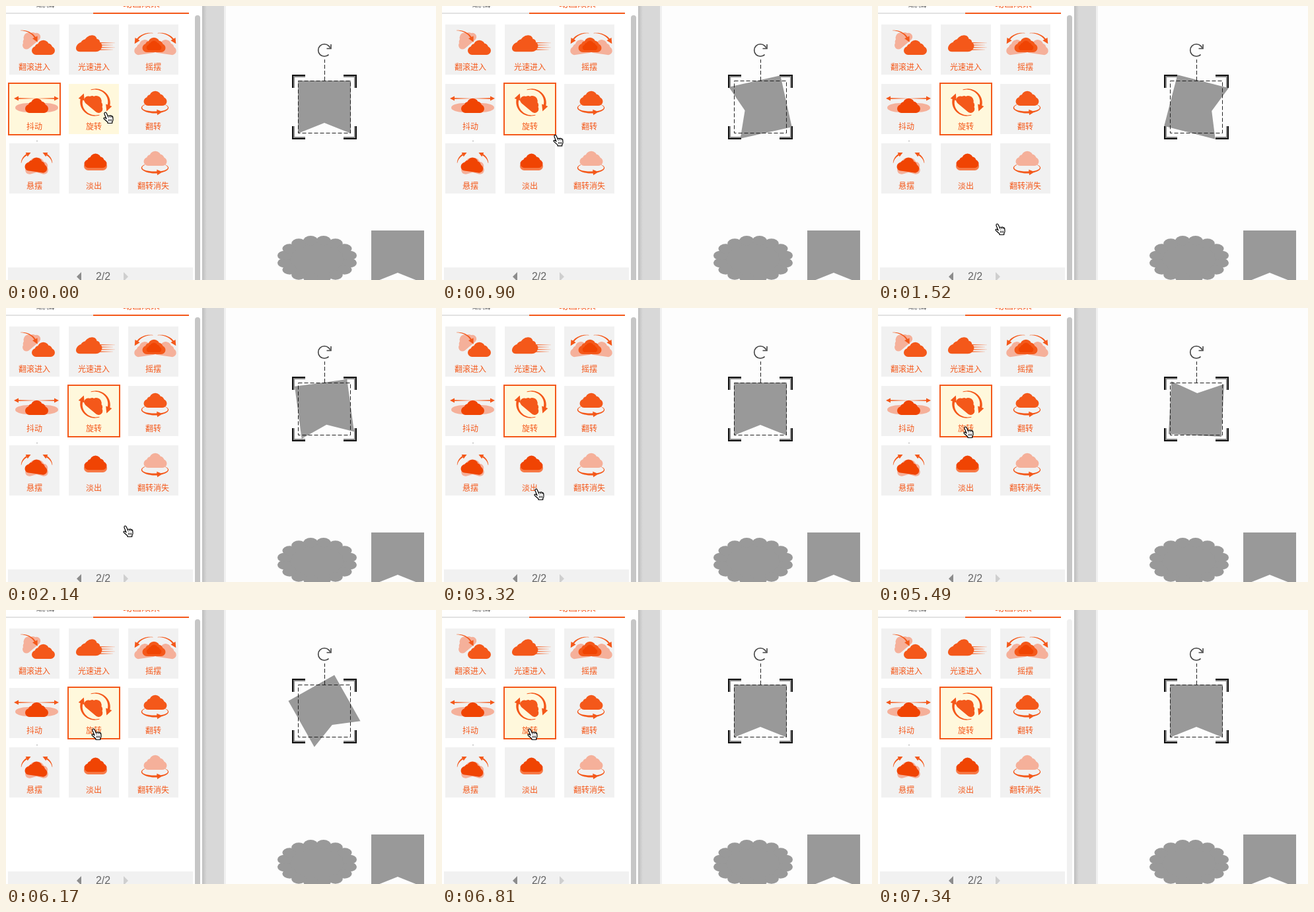
An HTML page with a canvas for the animation above (8560 ms loop, 651 by 415 pixels).

```html
<!DOCTYPE html>
<html lang="zh-CN">
<head>
<meta charset="utf-8">
<title>动画效果</title>
<style>
html, body { margin: 0; width: 100%; height: 100%; overflow: hidden; background: #fff; }
canvas { display: block; }
</style>
</head>
<body>
<canvas id="stage" width="651" height="415"></canvas>
<script>
const ctx = document.getElementById('stage').getContext('2d');
const LOOP = 8560;
const CJK = '"Noto Sans CJK SC", "Noto Sans CJK", sans-serif';
const ORANGE = '#f4581a', DEEP = '#f04403', PALE = '#f5b09a', SOFT = '#f77a48';
const TILE = '#f1f1f1', WARM = '#fff8dc', GRAY = '#999';
const RAD = Math.PI / 180;

// bursts of screen updates: start, end, step
const BURSTS = [
  [480, 480, 1], [620, 2540, 56.2], [3320, 3660, 56.6], [4470, 4640, 56.6],
  [4970, 5780, 57.7], [5830, 6870, 56.6], [7040, 7340, 75]
];
// pointer path: time, x, y
const PATH = [
  [0, 147, 160], [760, 147, 160], [900, 168, 194], [1080, 174, 269], [1300, 177, 329],
  [3270, 177, 329], [3320, 139, 273], [3660, 126, 202], [4420, 126, 202], [4470, 126, 197],
  [4640, 129, 179], [6985, 129, 179], [7040, 142, 198], [7280, 306, 397], [LOOP, 306, 430]
];
const SPINS = [588, 4922], SPIN_MS = 1907;

function heldTime(t) {
  let held = 0;
  for (const [start, end, step] of BURSTS) {
    if (t >= start) held = start + Math.floor((Math.min(t, end) - start) / step) * step;
  }
  return held;
}

function pointerAt(t) {
  const i = Math.max(1, PATH.findIndex(p => p[0] >= t));
  const [t0, x0, y0] = PATH[i - 1], [t1, x1, y1] = PATH[i];
  const k = (t - t0) / (t1 - t0);
  return [x0 + (x1 - x0) * k, y0 + (y1 - y0) * k];
}

// cubic-bezier(.25, .1, .25, 1)
function ease(x) {
  let lo = 0, hi = 1;
  for (let i = 0; i < 24; i++) {
    const s = (lo + hi) / 2;
    if (.75 * s - .75 * s * s + s ** 3 < x) lo = s; else hi = s;
  }
  return .3 * lo * (1 - lo) ** 2 + 3 * lo * lo * (1 - lo) + lo ** 3;
}

function spinAt(t) {
  const start = SPINS.find(s => t > s && t < s + SPIN_MS);
  return start === undefined ? 0 : 360 * ease((t - start) / SPIN_MS);
}

function rect(x, y, w, h, color) {
  ctx.fillStyle = color;
  ctx.fillRect(x, y, w, h);
}

function poly(points, color) {
  ctx.fillStyle = color;
  ctx.beginPath();
  points.forEach(([x, y]) => ctx.lineTo(x, y));
  ctx.closePath();
  ctx.fill();
}

function label(text, x, y, font, color) {
  ctx.font = font;
  ctx.fillStyle = color;
  ctx.textAlign = 'center';
  ctx.fillText(text, x, y);
}

function oval(x, y, rx, ry, color) {
  ctx.fillStyle = color;
  ctx.beginPath();
  ctx.ellipse(x, y, rx, ry, 0, 0, 7);
  ctx.fill();
}

function cloud(cx, cy, w, color, rot = 0, lean = 0) {
  ctx.save();
  ctx.translate(cx, cy);
  ctx.rotate(rot * RAD);
  ctx.scale(w / 34, w / 34);
  ctx.transform(1, 0, -lean, 1, 0, 0);
  ctx.fillStyle = color;
  ctx.beginPath();
  for (const [x, y, r] of [[-11, 4.5, 6.5], [-7, 0, 6], [0, -2.5, 8.8], [7, 0, 6.5], [11, 4.5, 6.5]]) {
    ctx.moveTo(x + r, y);
    ctx.arc(x, y, r, 0, 7);
  }
  ctx.rect(-11, 0, 22, 11);
  ctx.fill();
  ctx.restore();
}

function head(x, y, dir, size, color) {
  const c = Math.cos(dir) * size, s = Math.sin(dir) * size;
  poly([[x + c, y + s], [x - c * .4 - s * .7, y - s * .4 + c * .7],
        [x - c * .4 + s * .7, y - s * .4 - c * .7]], color);
}

// arc that thickens towards its arrow head
function sweep(cx, cy, rx, ry, from, to, width = 2.4, size = 6) {
  const outer = [], inner = [], N = 24;
  for (let i = 0; i <= N; i++) {
    const a = (from + (to - from) * i / N) * RAD, w = width * (.2 + .8 * i / N) / 2;
    outer.push([cx + (rx + w) * Math.cos(a), cy + (ry + w) * Math.sin(a)]);
    inner.unshift([cx + (rx - w) * Math.cos(a), cy + (ry - w) * Math.sin(a)]);
  }
  poly([...outer, ...inner], ORANGE);
  if (!size) return;
  const a = to * RAD, sign = Math.sign(to - from);
  const dir = Math.atan2(ry * Math.cos(a) * sign, -rx * Math.sin(a) * sign);
  head(cx + rx * Math.cos(a), cy + ry * Math.sin(a), dir, size, ORANGE);
}

function fadeLine(x0, x1, y, h) {
  const g = ctx.createLinearGradient(x0, 0, x1, 0);
  g.addColorStop(0, ORANGE);
  g.addColorStop(1, 'rgba(244,88,26,.1)');
  rect(Math.min(x0, x1), y, Math.abs(x1 - x0), h, g);
}

function flip(y, color) {
  sweep(225.5, y + 14, 20, 7, -40, 62, 2.4, 0);
  sweep(225.5, y + 14, 20, 7, 220, 74, 3.4, 6);
  cloud(226, y, 34, color);
}

const TILES = [
  ['翻滚进入', () => {
    cloud(36, 50, 31, PALE, -40);
    cloud(56.5, 63, 34, ORANGE);
    sweep(23, 58, 24, 21, -92, -24);
  }],
  ['光速进入', () => {
    [55, 58.5, 62, 65.5].forEach((y, i) => fadeLine(140, 165 - i % 2 * 3, y, 1.4));
    cloud(127, 57, 38, ORANGE, 0, .25);
  }],
  ['摇摆', () => {
    cloud(210.5, 62, 33, PALE, -8);
    cloud(241.5, 62, 33, PALE, 8);
    cloud(224, 59, 34, ORANGE);
    cloud(224, 60, 22, DEEP);
    sweep(219, 62, 24, 21, -82, -152);
    sweep(233, 62, 24, 21, -98, -28);
  }],
  ['抖动', () => {
    oval(33, 154, 19, 7, PALE);
    oval(60, 154, 19, 7, PALE);
    cloud(46.5, 151, 34, DEEP);
    fadeLine(17, 45, 139.2, 1.8);
    fadeLine(75, 47, 139.2, 1.8);
    head(17, 140, Math.PI, 5, ORANGE);
    head(75, 140, 0, 5, ORANGE);
  }],
  ['旋转', () => {
    cloud(135, 146, 32, ORANGE, 40);
    sweep(135, 146, 21, 20, -108, 20, 4, 7);
    sweep(135, 146, 21, 20, 72, 200, 4, 7);
  }],
  ['翻转', () => flip(140, ORANGE)],
  ['悬摆', () => {
    cloud(45, 241, 34, PALE, -16);
    cloud(48, 241, 34, PALE, 16);
    cloud(46, 240.5, 33, DEEP, 8);
    sweep(43, 239, 20, 17, 184, 240, 2.6, 5);
    sweep(50, 239, 20, 17, -4, -60, 2.6, 5);
  }],
  ['淡出', () => {
    cloud(135.5, 238, 34, SOFT);
    cloud(135.5, 234.5, 33, DEEP);
  }],
  ['翻转消失', () => flip(231, PALE)]
];

function drawPanel(t, active, hover) {
  label('编辑', 59.5, 1, '14px ' + CJK, '#666');
  label('动画效果', 205, 1, '14px ' + CJK, ORANGE);
  rect(0, 10, 132, 2, '#e2e2e2');
  rect(132, 10, 145, 2, ORANGE);

  TILES.forEach(([name, icon], i) => {
    const x = 5 + i % 3 * 90, y = 28 + Math.floor(i / 3) * 90;
    if (i === active) rect(x - 2, y - 2, 80, 80, ORANGE);
    rect(x, y, 76, 76, i === active || i === hover ? WARM : TILE);
    icon();
    label(name, x + 38, y + 69, '12px ' + CJK, ORANGE);
  });
  rect(46, 204, 2, 1, '#aaa');

  rect(3, 396, 280, 19, TILE);
  poly([[107, 410], [114, 403], [114, 417]], '#8c8c8c');
  poly([[185, 410], [178, 403], [178, 417]], '#cfcfcf');
  label('2/2', 147, 415, '16px "Liberation Sans", Arial, sans-serif', '#666');

  ctx.fillStyle = t < 7340 ? '#c6c6c6' : '#f0f0f0';
  ctx.beginPath();
  ctx.roundRect(286, 14, 8, 420, 4);
  ctx.fill();

  const edge = ctx.createLinearGradient(297, 0, 304, 0);
  edge.addColorStop(0, '#bdbdbd');
  edge.addColorStop(1, '#d8d8d8');
  rect(297, 0, 33, 415, edge);
  rect(330, 0, 3, 415, '#f0f0f0');
}

function banner(cx, cy, rot) {
  ctx.save();
  ctx.translate(cx, cy);
  ctx.rotate(rot * RAD);
  poly([[-40, -40], [40, -40], [40, 40], [0, 24], [-40, 40]], GRAY);
  ctx.restore();
}

function drawHandles() {
  ctx.strokeStyle = '#222';
  ctx.lineWidth = 1;
  ctx.setLineDash([6, 3]);
  ctx.strokeRect(442.5, 113.5, 79, 79);
  ctx.beginPath();
  ctx.moveTo(482.5, 113);
  ctx.lineTo(482.5, 81);
  ctx.stroke();
  ctx.setLineDash([]);

  for (const sx of [-1, 1]) for (const sy of [-1, 1]) {
    ctx.save();
    ctx.translate(482, 153);
    ctx.scale(sx, sy);
    rect(29, 45, 18, 2, '#888');
    rect(45, 29, 2, 18, '#888');
    rect(29, 47, 20, 2, '#111');
    rect(47, 29, 2, 20, '#111');
    ctx.restore();
  }

  ctx.strokeStyle = '#444';
  ctx.lineWidth = 1.6;
  ctx.beginPath();
  ctx.arc(482, 67, 9.3, 45 * RAD, 338 * RAD);
  ctx.stroke();
  ctx.beginPath();
  ctx.moveTo(492, 58);
  ctx.lineTo(492, 64.5);
  ctx.lineTo(485.5, 64.5);
  ctx.stroke();
}

function drawBadge() {
  const cx = 471, cy = 383.5, lobes = 16;
  oval(cx, cy, 51, 29, GRAY);
  for (let i = 0; i < lobes; i++) {
    const a = (i + .5) / lobes * 2 * Math.PI;
    oval(cx + 50 * Math.cos(a), cy + 28.8 * Math.sin(a), 11, 7.2, GRAY);
  }
}

function drawPointer(x, y) {
  ctx.save();
  ctx.translate(x, y);
  const hand = new Path2D('M2 2Q3.5 0 5 2L7.3 7Q8.5 5.3 10 6.5Q11.5 5.3 12.7 6.7Q14.3 6.3 14.8 8.5' +
    'L15 12Q15 14 13.7 15.5V17.5H7V16L2 11.5Q0 9.5 2 9Q3.5 9 5 10.8L2 3.5Z');
  ctx.fillStyle = '#fff';
  ctx.strokeStyle = '#000';
  ctx.lineWidth = 1.2;
  ctx.lineJoin = 'round';
  ctx.fill(hand);
  ctx.stroke(hand);
  ctx.lineWidth = .9;
  ctx.stroke(new Path2D('M7.3 7L8.3 9.5M10 6.7L10.8 9M12.7 6.9L13.2 9M8.5 11.5V14.5M10.5 11.5V14.5M12.5 11.5V14.5'));
  ctx.restore();
}

function draw(t) {
  rect(0, 0, 651, 415, '#fff');
  const active = t < 480 ? 3 : 4;
  const hover = t < 480 ? 4 : t > 3350 && t < 3640 ? 7 : -1;
  drawPanel(t, active, hover);
  rect(333, 0, 318, 415, '#fdfdfd');
  drawBadge();
  banner(593, 380, 0);
  banner(482, 153, spinAt(t));
  drawHandles();
  if (t < 7340) drawPointer(...pointerAt(t));
}

const began = performance.now();
function tick() {
  draw(heldTime((performance.now() - began) % LOOP));
  requestAnimationFrame(tick);
}
tick();
</script>
</body>
</html>
```
